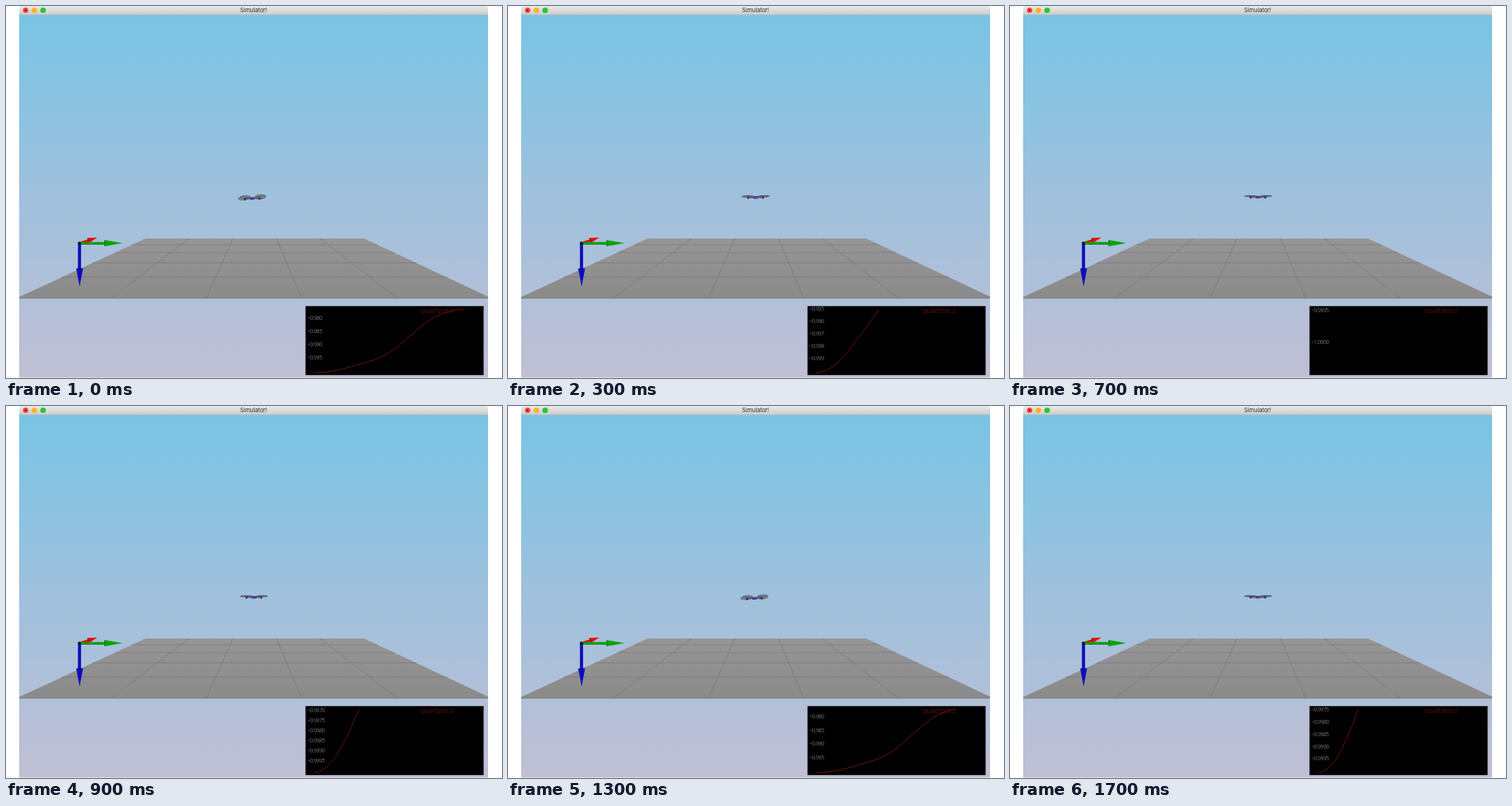
An HTML page with a canvas that plays this animation: 640 by 480 pixels, repeating every 1.8 s.

```html
<!DOCTYPE html>
<html lang="en">
<head>
<meta charset="utf-8">
<title>Simulator!</title>
<style>
html, body { margin: 0; width: 100%; height: 100%; overflow: hidden; background: #fff; }
canvas { display: block; }
</style>
</head>
<body>
<canvas id="stage" width="640" height="480"></canvas>
<script>
const ctx = document.getElementById('stage').getContext('2d');
const STEP = 100, START = 397, END = 592;

// Where the plotted line ends at each step; START or less means a fresh run.
const progress = [592, 409, 443, 478, 512, 547, 578, 388, 422,
                  456, 490, 524, 551, 577, 592, 381, 415, 449];

// Height gained, in thousandths, along the plot's x axis.
const climb = [[397, 0], [410, .18], [424, .72], [443, 2.03], [449, 2.6], [465, 3.9],
               [480, 5.4], [500, 8.7], [524, 14.6], [547, 20], [562, 22.2], [577, 23.5], [592, 24.1]];

function heightAt(x) {
  let i = 0;
  while (i < climb.length - 2 && x > climb[i + 1][0]) i++;
  const slope = k => {
    const a = climb[Math.max(0, k - 1)], b = climb[Math.min(climb.length - 1, k + 1)];
    return k === 0 ? 0 : (b[1] - a[1]) / (b[0] - a[0]);
  };
  const [x0, y0] = climb[i], [x1, y1] = climb[i + 1];
  const w = x1 - x0, u = (x - x0) / w, v = 1 - u;
  return (y0 * (1 + 2 * u) * v * v + slope(i) * w * u * v * v +
          y1 * u * u * (3 - 2 * u) - slope(i + 1) * w * u * u * v) / 1000;
}

function poly(points, fill) {
  ctx.beginPath();
  points.forEach(([x, y]) => ctx.lineTo(x, y));
  ctx.closePath();
  ctx.fillStyle = fill;
  ctx.fill();
}

function line(x0, y0, x1, y1, color, width = 1) {
  ctx.beginPath();
  ctx.moveTo(x0, y0);
  ctx.lineTo(x1, y1);
  ctx.strokeStyle = color;
  ctx.lineWidth = width;
  ctx.stroke();
}

function ellipse(x, y, rx, ry, fill, stroke) {
  ctx.beginPath();
  ctx.ellipse(x, y, rx, ry, 0, 0, Math.PI * 2);
  if (fill) { ctx.fillStyle = fill; ctx.fill(); }
  if (stroke) { ctx.strokeStyle = stroke; ctx.lineWidth = .8; ctx.stroke(); }
}

function gradient(y0, y1, colors) {
  const g = ctx.createLinearGradient(0, y0, 0, y1);
  colors.forEach((c, i) => g.addColorStop(i / (colors.length - 1), c));
  return g;
}

function text(s, x, y, font, color, spacing = 0, align = 'left') {
  ctx.font = font;
  ctx.letterSpacing = spacing + 'px';
  ctx.textAlign = align;
  ctx.textBaseline = 'middle';
  ctx.fillStyle = color;
  ctx.fillText(s, x, y);
}

function drawWindow() {
  ctx.fillStyle = '#fff';
  ctx.fillRect(0, 0, 640, 480);
  ctx.fillStyle = gradient(11, 480, ['#7ac3e4', '#8ac3e1', '#9fc1dd', '#b0c0d9', '#c0bfd3']);
  ctx.fillRect(17, 11, 605, 468.5);
  ctx.beginPath();
  ctx.roundRect(17, 0, 605, 11.5, [3, 3, 0, 0]);
  ctx.fillStyle = gradient(0, 11, ['#e9e9e9', '#cecece']);
  ctx.fill();
  line(17, 11.2, 622, 11.2, '#aeb4b6', .6);
  ['#fb4a48', '#fdb526', '#29c732'].forEach((c, i) => ellipse(25.3 + i * 11.3, 5.5, 3.6, 3.6, c));
  ellipse(25.3, 5.5, 1.3, 1.3, '#7d0d0b');
  text('Simulator!', 319.5, 5.8, '7.4px Inter, sans-serif', '#333', 0, 'center');
}

function drawFloor() {
  const top = { y: 300, x: 180, w: 282 }, bottom = { y: 377, x: 13, w: 614 };
  const at = (u, y) => {
    const k = (y - top.y) / (bottom.y - top.y);
    return top.x + (bottom.x - top.x) * k + u * (top.w + (bottom.w - top.w) * k);
  };
  ctx.save();
  ctx.beginPath();
  ctx.rect(17, 290, 605, 90);
  ctx.clip();
  poly([[180, 300], [462, 300], [627, 377.3], [13, 377.3]], gradient(300, 377, ['#969696', '#8a8a8a']));
  for (let i = 1; i < 5; i++) {
    line(at(i / 5, 300), 300, at(i / 5, 377), 377, '#7c7c7c', .8);
    const width = 1 / (1 / top.w + (1 / bottom.w - 1 / top.w) * i / 5);
    const y = top.y + (width - top.w) / (bottom.w - top.w) * 77;
    line(at(0, y), y, at(1, y), y, '#7c7c7c', .8);
  }
  line(17, 377, 622, 377, '#777', .7);
  ctx.restore();
}

function arrow(x, y, angle, length, head, half, shaft, color, edge) {
  ctx.save();
  ctx.translate(x, y);
  ctx.rotate(angle);
  line(0, 0, length - head, 0, color, shaft);
  line(0, shaft / 2, length - head, shaft / 2, edge, .7);
  poly([[length - head, -half], [length, 0], [length - head, half]], color);
  line(length - head, -half, length - head, half, edge, .9);
  ctx.restore();
}

function drawAxes() {
  arrow(95, 306, -.31, 24, 12, 3.2, 3, '#e60d08', '#8a0805');
  arrow(95, 306, 0, 55.5, 23, 4, 3, '#0ca30c', '#087008');
  arrow(95, 306, Math.PI / 2, 56, 23, 4.3, 3.6, '#0c08c4', '#08067c');
  ellipse(94.6, 306, 1.9, 1.9, '#171717');
}

function drawDrone(end) {
  const p = Math.max(0, Math.min(1, (end - START) / (END - START)));
  const tilt = Math.max(0, (p - .25) / .75);
  ctx.save();
  ctx.translate(320 - 2.4 * tilt, 245.3 + 1.7 * tilt);
  ctx.rotate(-.055 * tilt);
  const open = .5 + 1.5 * tilt;
  const disc = 'rgba(112,124,126,.55)', rim = '#505860';
  [-10, 10].forEach(x => ellipse(x + 1, -.8 * tilt, 6.8, open, disc, rim));
  line(-11, .3, 11, .3, '#53515f', 1.2);
  [-11, 10].forEach(x => ellipse(x, .7 * tilt, 6.8, open, disc, rim));
  line(-10, 1.5, 10, 1.5, '#4c4a7c', 1.1);
  [-9.5, 9.5].forEach(x => {
    ctx.fillStyle = '#30295d';
    ctx.fillRect(x - 1.2, .5, 2.4, 2.5);
  });
  ctx.fillStyle = '#4540a0';
  ctx.fillRect(-3, .2, 6, 2.8);
  ctx.fillStyle = '#c04052';
  ctx.fillRect(4, 1, 2.5, 1.2);
  ctx.fillRect(-6.2, 1.1, 1.8, 1);
  ctx.restore();
}

function drawPlot(end) {
  const fresh = end <= START;
  const scale = fresh ? 82000 : 82 / heightAt(end);
  const base = fresh ? 436 : 473;
  ctx.save();
  ctx.beginPath();
  ctx.rect(386.5, 387.3, 229.8, 89);
  ctx.clip();
  ctx.fillStyle = '#000';
  ctx.fillRect(386, 387, 231, 90);

  if (!fresh) {
    ctx.beginPath();
    for (let x = START; x <= end; x++) ctx.lineTo(x, base - scale * heightAt(x));
    ctx.strokeStyle = '#74130f';
    ctx.lineWidth = .9;
    ctx.stroke();
  }

  // Smallest tick of 1 or 5 times a power of ten that leaves room for the text.
  let digits = 6, tick = 1e-6;
  while (tick * scale < 12) {
    if (tick * 5 * scale >= 12) { tick *= 5; break; }
    tick *= 10;
    digits--;
  }
  for (let i = 0; i < 9; i++) {
    const y = base - 2 - i * tick * scale;
    if (y < 389.5 || y > 465) continue;
    text('−' + (1 - i * tick).toFixed(digits), 388.5, y + .3,
      '300 7.4px "Open Sans", sans-serif', '#aaa', -.65);
  }
  text('quad.pos.z', 535, 393.2, '300 9.2px "Open Sans", sans-serif', '#84150f', -.25);
  ctx.restore();
}

function render(now) {
  const end = progress[Math.floor(now / STEP) % progress.length];
  drawWindow();
  drawFloor();
  drawAxes();
  drawDrone(end);
  drawPlot(end);
}

const started = performance.now();
function loop() {
  render(performance.now() - started);
  requestAnimationFrame(loop);
}
loop();
</script>
</body>
</html>
```
